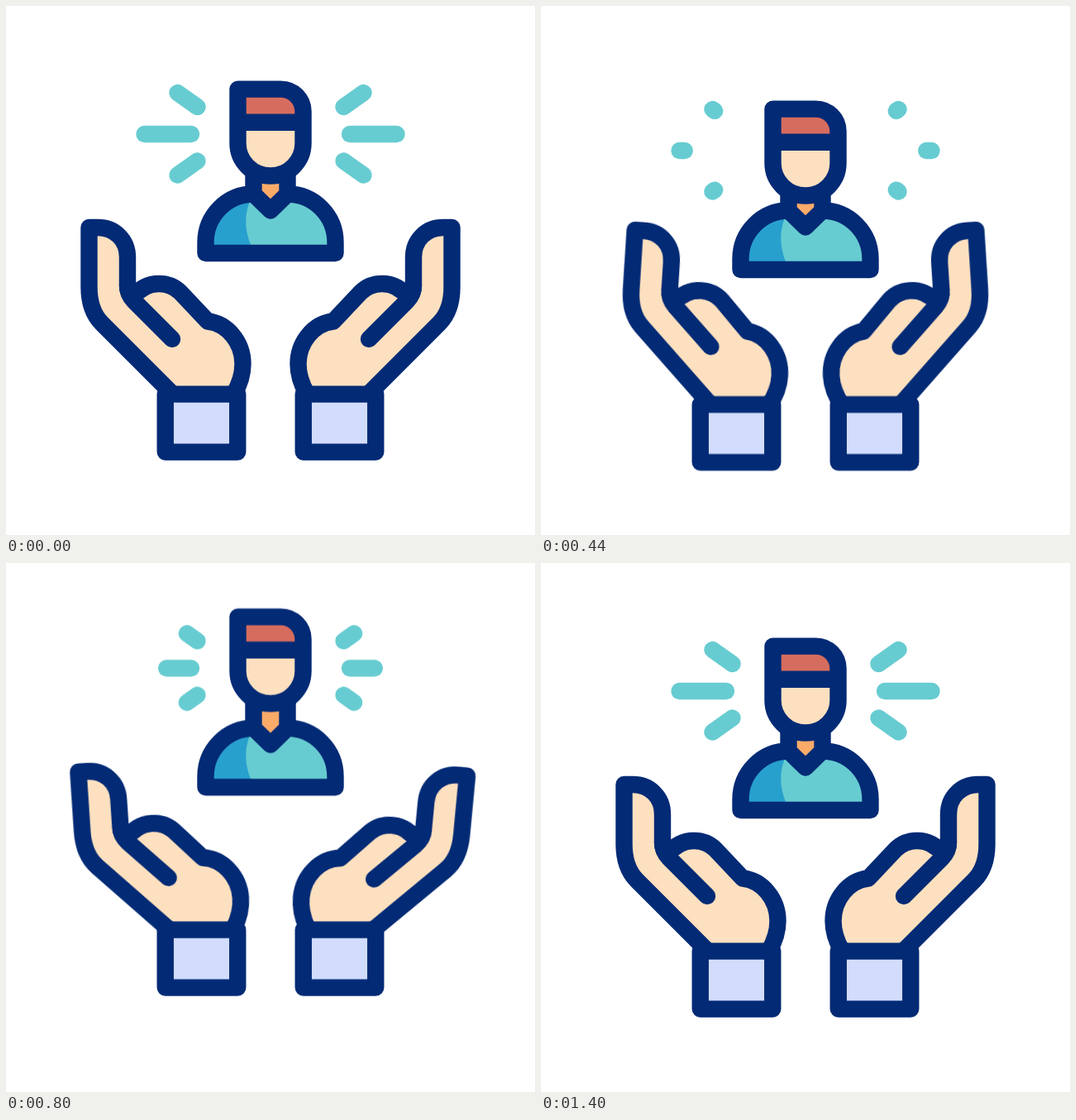
Write an HTML page that moves like this. It is 640 by 640 pixels and loops after 1720 ms.

```html
<!DOCTYPE html>
<html lang="en">
<head>
<meta charset="utf-8">
<title>Caring hands</title>
<style>
  html, body { margin: 0; height: 100%; overflow: hidden; background: #fff; }
  svg { display: block; width: 100vw; height: 100vh; }

  .ink { stroke: #032a75; stroke-width: 20.4; stroke-linecap: round; stroke-linejoin: round; }
  .skin { fill: #fde0bf; }
  .teal { fill: #67ccd1; }
  .bare { fill: none; }
  .rays { fill: none; stroke: #67ccd1; stroke-width: 20.4; stroke-linecap: round; }

  .lift, .tilt, .torso, .head, .rays path {
    animation: 1720ms cubic-bezier(.333, 0, .667, 1) infinite;
  }
  .lift { animation-name: lift; }
  .tilt { animation-name: tilt; transform-origin: 255px 471px; }
  .torso { animation-name: torso; }
  .head { animation-name: head; }
  .rays path { animation-name: trim; stroke-dasharray: 1 3; }

  @keyframes lift {
    0%, 3.49% { transform: translateY(0); }
    25.58%, 26.74% { transform: translateY(12.5px); }
    47.67%, 50% { transform: translateY(-26.2px); }
    73.55%, 100% { transform: translateY(0); }
  }
  @keyframes tilt {
    0%, 12.79% { transform: rotate(0deg); }
    30.23% { transform: rotate(4.4deg); }
    50.29%, 51.16% { transform: rotate(var(--open)); }
    80.23%, 100% { transform: rotate(0deg); }
  }
  @keyframes torso {
    0%, 4.65% { transform: translateY(0); }
    22.97%, 30.52% { transform: translateY(20px); }
    47.67%, 50% { transform: translateY(-28.3px); }
    73.55%, 100% { transform: translateY(0); }
  }
  @keyframes head {
    0%, 4.65% { transform: translateY(0); }
    25.58%, 30.52% { transform: translateY(24px); }
    47.67%, 50% { transform: translateY(-36.2px); }
    73.55%, 100% { transform: translateY(0); }
  }
  /* Rays retract outward, then grow again from the inner end. */
  @keyframes trim {
    0%, 8.72% { stroke-dashoffset: 0; }
    30.52% { stroke-dashoffset: -1.02; animation-timing-function: step-start; }
    30.6% { stroke-dashoffset: 1.02; }
    36.05% { stroke-dashoffset: 1.02; animation-timing-function: ease; }
    69.77%, 100% { stroke-dashoffset: 0; }
  }
</style>
</head>
<body>
<svg viewBox="0 0 640 640">
  <defs>
    <g id="hand">
      <path class="skin" d="M202 470L116 384C106 374 100.5 358 100.5 340V268H111C131.5 268 147 283 147 304V338C147 345 149 349 153 353C162 341 173 336 185 336C195 336 204 339.5 211 346.5L244 381.5C268 384 286.5 407 286.5 433C286.5 446 283 457 276 469"/>
      <path class="bare" d="M147 338C147 347 150 352 155 357L201 403"/>
    </g>
    <rect id="cuff" x="192.75" y="469.6" width="87.5" height="70" fill="#d2dcfd"/>
  </defs>

  <g class="torso">
    <g class="rays">
      <path pathLength="1" d="M224 155H167.5"/>
      <path pathLength="1" d="M231.5 122L207.5 105"/>
      <path pathLength="1" d="M231.5 187.5L207.5 204.5"/>
      <path pathLength="1" d="M416 155H472.5"/>
      <path pathLength="1" d="M408.5 122L432.5 105"/>
      <path pathLength="1" d="M408.5 187.5L432.5 204.5"/>
    </g>
    <path fill="#fbab69" d="M299.5 190H340.5V228L320 247.5L299.5 228Z"/>
    <path class="teal" d="M241.5 299V286A58 58.5 0 0 1 299.5 227.5L320 247.5L340.5 227.5A58 58.5 0 0 1 398.5 286V299Z"/>
    <path fill="#28a0ce" d="M241.5 299V286A58 58.5 0 0 1 299.5 227.5C289 245 285 270 301 299Z"/>
    <path class="ink bare" d="M241.5 299V286A58 58.5 0 0 1 299.5 227.5L320 247.5L340.5 227.5A58 58.5 0 0 1 398.5 286V299ZM299.5 192V227.5M340.5 192V227.5"/>
  </g>

  <g class="head">
    <path class="skin" d="M280.5 140.7H359.5V166A39.5 39.5 0 0 1 280.5 166Z"/>
    <path fill="#d66c5e" d="M280.5 140.7V100.6H332.5A27 27 0 0 1 359.5 127.6V140.7Z"/>
    <path class="ink bare" d="M280.5 100.6H332.5A27 27 0 0 1 359.5 127.6V166A39.5 39.5 0 0 1 280.5 166ZM280.5 140.7H359.5"/>
  </g>

  <g class="ink">
    <g class="lift">
      <g class="tilt" style="--open: -4.6deg"><use href="#hand"/></g>
      <use href="#cuff"/>
    </g>
    <g transform="translate(640 0) scale(-1 1)">
      <g class="lift">
        <g class="tilt" style="--open: -6.4deg"><use href="#hand"/></g>
        <use href="#cuff"/>
      </g>
    </g>
  </g>
</svg>
</body>
</html>
```
